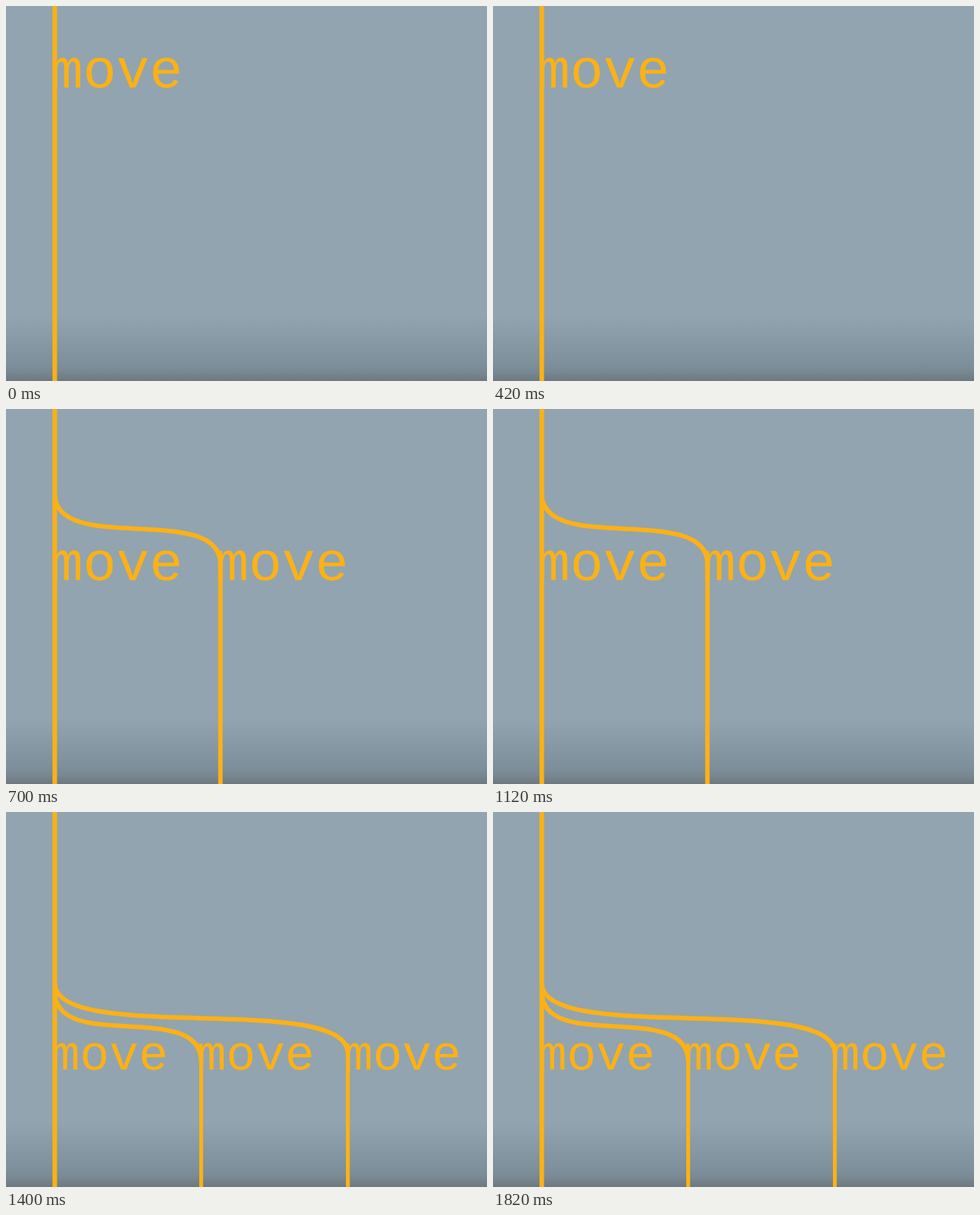
Write an HTML page that moves like this. It is 590 px wide and 460 px high and loops after 2.1 s.

```html
<!DOCTYPE html>
<html lang="en">
<head>
<meta charset="utf-8">
<title>move</title>
<style>
  html, body { margin: 0; width: 100%; height: 100%; overflow: hidden; }
  body { background: #92a4af; }
  svg { display: block; width: 590px; height: 460px; }
  path { fill: none; stroke: #fcb116; }
  text { fill: #fcb116; font-family: "Liberation Mono", "Courier New", monospace; }
</style>
</head>
<body>
<svg id="stage" viewBox="0 0 590 460">
  <defs>
    <linearGradient id="shade" x1="0" y1="0" x2="0" y2="1">
      <stop offset="0" stop-color="#92a4af"/>
      <stop offset=".75" stop-color="#7d8f9a"/>
      <stop offset=".85" stop-color="#798993"/>
      <stop offset="1" stop-color="#6e7880"/>
    </linearGradient>
  </defs>
  <rect width="590" height="460" fill="#92a4af"/>
  <rect y="380" width="590" height="80" fill="url(#shade)"/>
  <path d="M59.8 0V460" stroke-width="5.6"/>
</svg>
<script>
const LOOP = 2100;
const ROOT = 59.8;
const stage = document.getElementById('stage');

// Each branch is [x of its line, y of the middle of its curve].
const steps = [
  { size: 68, base: 99.5, stem: 5.4, branches: [] },
  { size: 68, base: 209.5, stem: 5.4, branches: [[263, 147]] },
  { size: 60.2, base: 316, stem: 4.7, branches: [[239.4, 263], [419.3, 253]] }
];

function add(parent, tag, attrs, label) {
  const el = document.createElementNS('http://www.w3.org/2000/svg', tag);
  for (const key in attrs) el.setAttribute(key, attrs[key]);
  if (label) el.textContent = label;
  parent.append(el);
  return el;
}

function drawBranch(group, x, mid, stem) {
  const rise = 43, pull = 33;
  add(group, 'path', {
    d: `M${ROOT} ${mid - rise}C${ROOT} ${mid + pull} ${x} ${mid - pull} ${x} ${mid + rise}`,
    'stroke-width': 5.5
  });
  add(group, 'path', { d: `M${x} ${mid + rise - 1}V460`, 'stroke-width': stem });
}

steps.forEach(({ size, base, stem, branches }, i) => {
  const group = add(stage, 'g', {});
  branches.forEach(([x, mid]) => drawBranch(group, x, mid, stem));
  [ROOT, ...branches.map(b => b[0])].forEach(x =>
    add(group, 'text', { x: x - size * 0.09, y: base, 'font-size': size }, 'move'));

  const frames = steps.map((_, k) => ({
    offset: k / steps.length,
    opacity: k === i ? 1 : 0,
    easing: 'step-end'
  }));
  frames.push({ offset: 1, opacity: frames[0].opacity });
  group.animate(frames, { duration: LOOP, iterations: Infinity }).startTime = 0;
});
</script>
</body>
</html>
```
